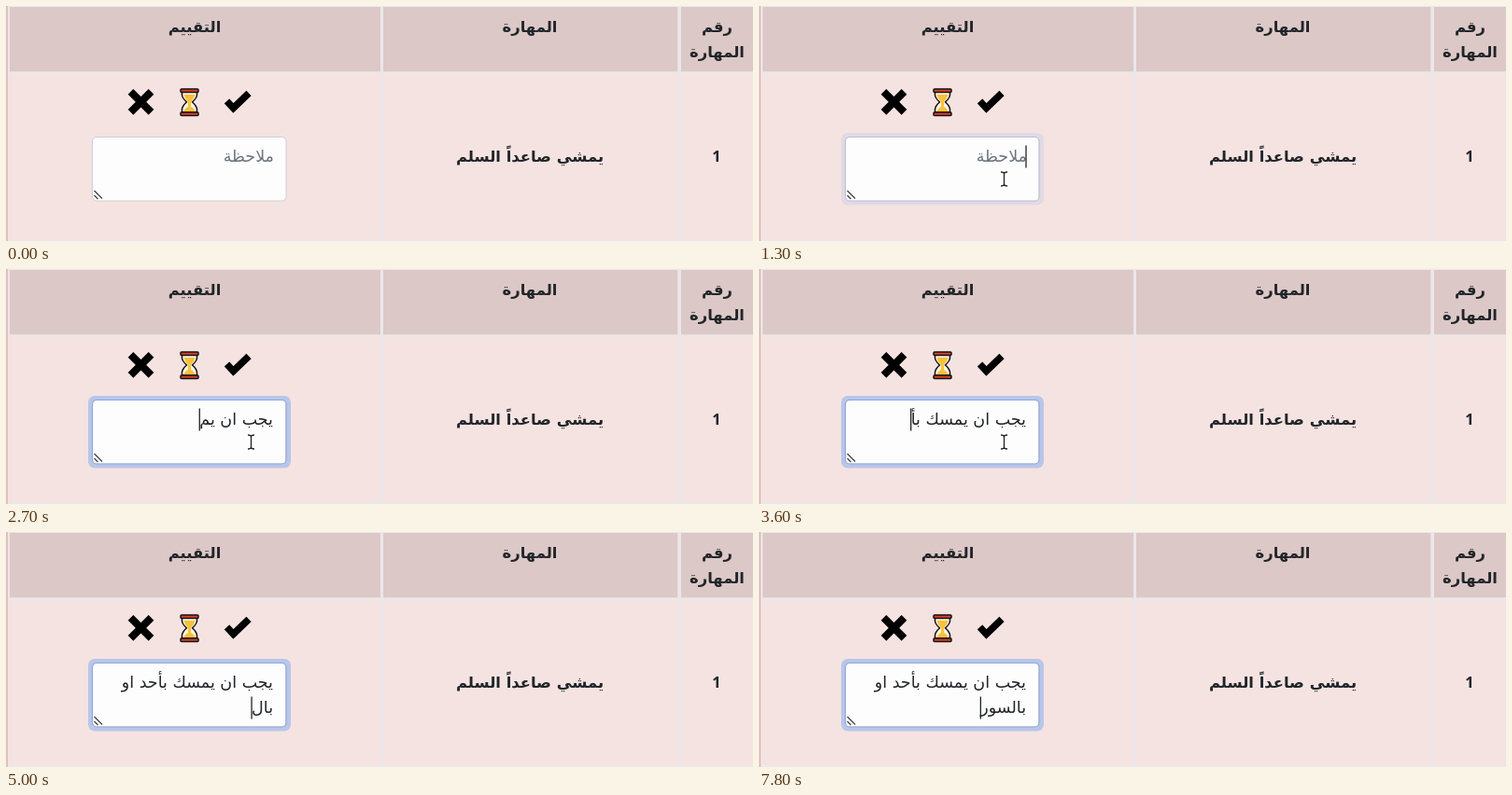
Recreate the animation shown at these times as an HTML page. Size 800x252 px, loop 7.9 s.

```html
<!DOCTYPE html>
<html lang="ar">
<head>
<meta charset="utf-8">
<style>
html, body { margin: 0; width: 100%; height: 100%; overflow: hidden; background: #f5e3e1; }
svg { display: block; width: 800px; height: 252px; }
text { font-family: "DejaVu Sans", sans-serif; font-size: 17.5px; direction: rtl; white-space: pre; }
.bold text { font-size: 16.4px; font-weight: 700; text-anchor: middle; fill: #212529; }
.note { fill: #212529; }
</style>
</head>
<body>
<svg viewBox="0 0 800 252">
  <rect width="800" height="252" fill="#f5e3e1"/>
  <path fill="#dcc8c7" d="M4 1H401V70.500H4ZM404 1H719.500V70.500H404ZM723 1H800V70.500H723Z"/>
  <path fill="#ebe7e9" d="M0 0H800V1H0ZM2 70.500H800V73H2ZM401 0H404V252H401ZM719.500 0H723V252H719.500ZM2 250H800V252H2Z"/>
  <path fill="#ebe7e9" d="M2 0H4V72H2Z"/>
  <path fill="#dfc0be" d="M0 0H2V252H0Z"/>

  <g class="bold">
    <text x="202" y="28">التقييم</text>
    <text x="561" y="28">المهارة</text>
    <text x="761.5" y="28">رقم</text>
    <text x="761.5" y="55">المهارة</text>
    <text x="561" y="167">يمشي صاعداً السلم</text>
    <text x="761" y="167" style="font-family:'Noto Sans',sans-serif">1</text>
  </g>

  <path d="M133.500 91.800L155.500 113.800M155.500 91.800L133.500 113.800" stroke="#000" stroke-width="8"/>
  <path d="M236.500 102L243.500 109.500L260 93.500" fill="none" stroke="#000" stroke-width="7.500"/>

  <g stroke="#111" stroke-width="1.500" stroke-linejoin="round">
    <path fill="#fdf3e4" d="M188.500 92V95.500Q189 99 193.500 103Q189 107 188.500 110.500V114H204.500V110.500Q204 107 199.500 103Q204 99 204.500 95.500V92Z"/>
    <path fill="#f8c33b" stroke="none" d="M190.500 95H202.500Q202 99 198 103V108Q202 110 202.500 113.500H190.500Q191 110 195 108V103Q191 99 190.500 95Z"/>
    <rect x="187" y="89" width="19" height="3.500" rx="1" fill="#d8402c"/>
    <rect x="187" y="114" width="19" height="3.500" rx="1" fill="#d8402c"/>
  </g>

  <rect id="ring" x="88" y="136" width="217" height="77.500" rx="7" fill="#b8c6ea"/>
  <rect x="92.500" y="140.500" width="207.500" height="68.500" rx="4.500" fill="#fefdfe" stroke="#d0cdd3"/>
  <rect id="edge" x="92.500" y="140.500" width="207.500" height="68.500" rx="4.500" fill="none" stroke="#8fa5dd" stroke-width="1.200"/>
  <path d="M94.500 198L103 206.500M94.500 203L98.500 207" stroke="#444" stroke-width="1.300"/>
  <text id="hint" x="287" y="167" fill="#6c757d">ملاحظة</text>
  <text id="line0" class="note" x="286" y="167"></text>
  <text id="line1" class="note" x="286" y="194"></text>
  <path id="caret" d="M0 0V24" stroke="#222" stroke-width="1.300"/>
  <path id="beam" fill="none" stroke="#222" stroke-width="1.300" d="M-3.500 -7.500Q0 -7.500 0 -5.500Q0 -7.500 3.500 -7.500M0 -6V6M-3.500 7.500Q0 7.500 0 5.500Q0 7.500 3.500 7.500"/>
</svg>
<script>
const LOOP = 7900;
const FOCUS = 1300, LAST_KEY = 5400;
const $ = id => document.getElementById(id);
const clamp = v => Math.max(0, Math.min(1, v));
const lines = [
  { el: $('line0'), text: 'يجب ان يمسك بأحد او ',
    keys: [1500, 1600, 1800, 2000, 2200, 2300, 2400, 2500, 2700, 2900,
           3100, 3200, 3300, 3500, 3700, 3800, 4000, 4100, 4300, 4500] },
  { el: $('line1'), text: 'بالسور', keys: [4700, 4800, 4900, 5100, 5300, 5400] }
];

function show(el, on) { el.style.display = on ? '' : 'none'; }

function draw(t) {
  const focus = clamp((t - FOCUS + 50) / 150);
  $('ring').style.opacity = $('edge').style.opacity = focus;
  const typed = lines.map(({ el, text, keys }) => {
    const s = text.slice(0, keys.filter(k => k <= t).length);
    if (el.textContent !== s) el.textContent = s;
    return s;
  });
  show($('hint'), !typed[0]);

  const row = typed[1] ? 1 : 0;
  const width = typed[row] ? lines[row].el.getComputedTextLength() : 0;
  $('caret').setAttribute('transform', `translate(${286 - width} ${149.5 + 27 * row})`);
  show($('caret'), t >= FOCUS && (t < LAST_KEY || (t - LAST_KEY) % 1000 < 500));

  const rise = clamp((t - 900) / 200);
  $('beam').setAttribute('transform', `translate(262.500 ${185.5 + 75 * (1 - rise) ** 2})`);
  show($('beam'), t > 900 && t < 4700);
}

function tick(now) {
  draw(now % LOOP);
  requestAnimationFrame(tick);
}
draw(0);
requestAnimationFrame(tick);
</script>
</body>
</html>
```
